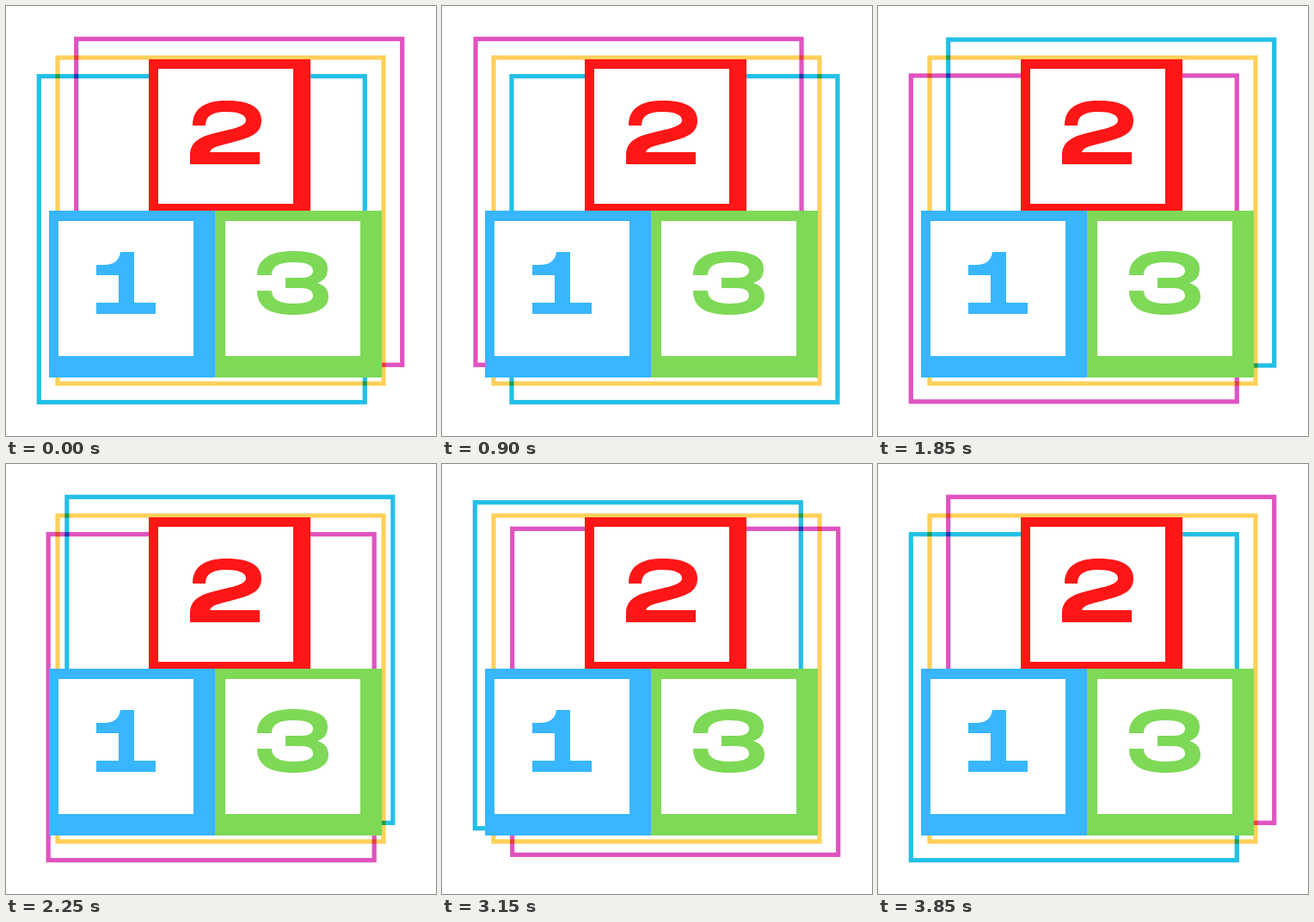
An HTML page that plays this animation: 500x500 px, repeating every 3.95 s.

```html
<!DOCTYPE html>
<html lang="en">
<head>
<meta charset="utf-8">
<title>Number blocks</title>
<style>
html, body { margin: 0; width: 100%; height: 100%; overflow: hidden; background: #fff; }
svg { display: block; width: 100vw; height: 100vh; }
.outline { fill: none; stroke-width: 5.2; mix-blend-mode: multiply; }
.face { fill: #fff; }
</style>
</head>
<body>
<svg viewBox="0 0 500 500" role="img" aria-label="Blocks 1, 2 and 3">
  <rect width="500" height="500" fill="#fff"/>
  <g id="outlines">
    <rect class="outline" x="60" y="60" width="379" height="379" stroke="#ffd05a"/>
    <rect class="outline" id="cyan" x="60" y="60" width="379" height="379" stroke="#22bfe6"/>
    <rect class="outline" id="pink" x="60" y="60" width="379" height="379" stroke="#e052c0"/>
  </g>
  <g fill="#ff1616">
    <rect x="166" y="62" width="188" height="176"/>
    <rect class="face" x="177" y="73" width="157" height="157"/>
    <path d="M217 139C217 120 230 110 256 110C282 110 297 117 297 133C297 148 285 153 265 158C250 162 238 164 237 170H295V184H214V174C214 156 228 151 250 146C268 142 279 139 279 133C279 126 270 123 255 123C240 123 232 128 232 139Z"/>
  </g>
  <g fill="#38b6ff">
    <rect x="50" y="238" width="193" height="194"/>
    <rect class="face" x="61" y="250" width="157" height="157"/>
    <path d="M133 286H149V345H174V358H105V345H131V313H105V301H114Q131 301 133 286Z"/>
  </g>
  <g fill="#7ed957">
    <rect x="243" y="238" width="194" height="194"/>
    <rect class="face" x="255" y="250" width="157" height="157"/>
    <path d="M292 313C292 295 306 285 334 285C360 285 374 292 374 305C374 314 371 319 362 322C371 325 375 330 375 338C375 352 360 359 334 359C306 359 292 350 292 331H309C309 341 318 346 334 346C349 346 357 343 357 337C357 331 352 328 343 328H325V316H343C352 316 357 313 357 308C357 301 349 298 334 298C317 298 309 303 309 313Z"/>
  </g>
</svg>
<script>
const LOOP = 3950, TICK = 50, STEP = 80, STEPS_PER_SIDE = 12, REACH = 21.7;
const corners = [[1, -1], [-1, -1], [-1, 1], [1, 1]];
const pink = document.getElementById('pink');
const cyan = document.getElementById('cyan');
const easeSine = p => (1 - Math.cos(Math.PI * p)) / 2;

// Steps of 80 ms, each shown from the next 50 ms tick on
function stepAt(ms) {
  return Math.floor(Math.floor(ms / TICK) * TICK / STEP);
}

function draw(now) {
  const sides = stepAt(now % LOOP) / STEPS_PER_SIDE;
  const side = Math.floor(sides);
  const from = corners[side % 4], to = corners[(side + 1) % 4];
  const p = easeSine(sides - side);
  const [x, y] = from.map((v, i) => REACH * (v + (to[i] - v) * p));
  pink.setAttribute('transform', `translate(${x} ${y})`);
  cyan.setAttribute('transform', `translate(${-x} ${-y})`);
}

const start = performance.now();
function loop() {
  draw(performance.now() - start);
  requestAnimationFrame(loop);
}
loop();
</script>
</body>
</html>
```
